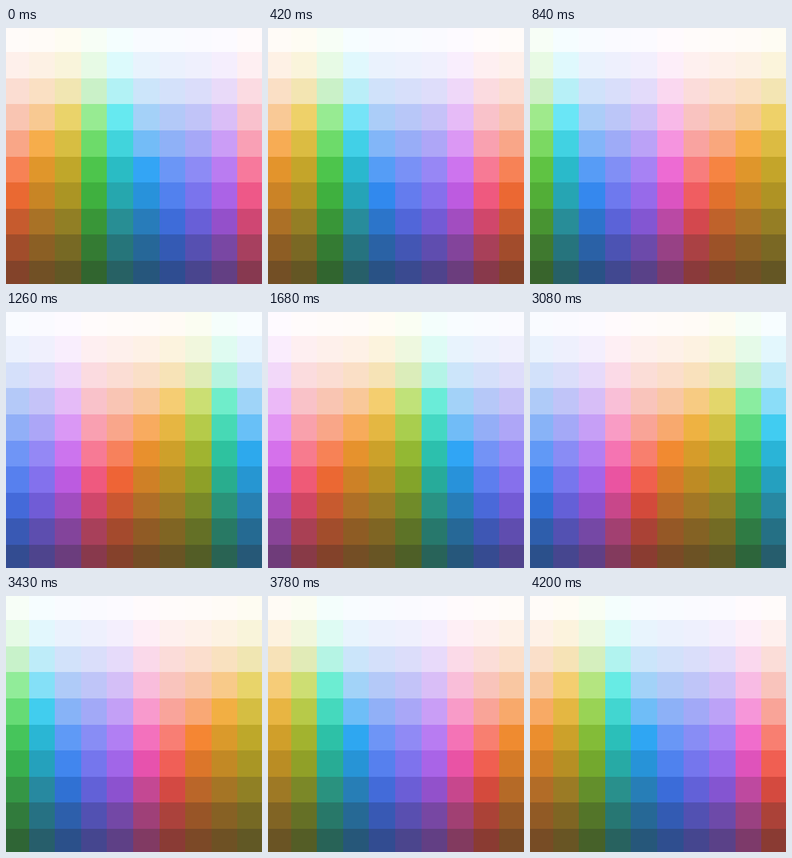
Recreate the animation shown at these times as an HTML page with a canvas. Size 320 by 320 pixels, loop 4270 ms.

```html
<!DOCTYPE html>
<html>
<head>
<meta charset="utf-8">
<style>
html, body { margin: 0; width: 320px; height: 320px; overflow: hidden; background: #fff; }
canvas { display: block; }
</style>
</head>
<body>
<canvas id="stage" width="320" height="320"></canvas>
<script>
const ctx = document.getElementById('stage').getContext('2d');
const STEP = 70, STEPS = 61, TAU = 2 * Math.PI;

// Rows from top to bottom: lightness, chroma ceiling, share of the sRGB gamut
const rows = [
  [.99, .015, .9], [.965, .035, .9], [.92, .07, .85], [.865, .15, .87], [.8, .2, .92],
  [.73, .23, .95], [.67, .23, .94], [.597, .2, .9], [.52, .155, .86], [.457, .12, .78]
];

// Hue in degrees at every half column around the wheel
const wheel = [0, 18, 33, 45, 60, 68, 83, 90, 106, 133, 155, 195, 228, 252, 262, 272, 283, 291, 308, 326];

function hueAt(u) {
  const p = ((u * 2) % 20 + 20) % 20, i = Math.floor(p);
  const next = i < 19 ? wheel[i + 1] : 360;
  return wheel[i] + (next - wheel[i]) * (p - i);
}

function linearRgb(L, C, h) {
  const a = C * Math.cos(h), b = C * Math.sin(h);
  const l = (L + .3963377774 * a + .2158037573 * b) ** 3;
  const m = (L - .1055613458 * a - .0638541728 * b) ** 3;
  const s = (L - .0894841775 * a - 1.291485548 * b) ** 3;
  return [
    4.0767416621 * l - 3.3077115913 * m + .2309699292 * s,
    -1.2684380046 * l + 2.6097574011 * m - .3413193965 * s,
    -.0041960863 * l - .7034186147 * m + 1.707614701 * s
  ];
}

function maxChroma(L, h) {
  let lo = 0, hi = .4;
  for (let i = 0; i < 14; i++) {
    const mid = (lo + hi) / 2;
    if (linearRgb(L, mid, h).every(v => v >= 0 && v <= 1)) lo = mid;
    else hi = mid;
  }
  return lo;
}

function encode(v) {
  v = Math.min(1, Math.max(0, v));
  return Math.round(255 * (v > .0031308 ? 1.055 * v ** (1 / 2.4) - .055 : 12.92 * v));
}

function color([light, ceiling, share], degrees) {
  const h = degrees * TAU / 360;
  // Blues sit slightly darker than the rest of their row
  const L = light - .2 * ceiling * Math.max(0, Math.cos(h - 4.8)) ** 2;
  const C = (ceiling ** -4 + (share * maxChroma(L, h) + 1e-4) ** -4) ** -.25;
  return `rgb(${linearRgb(L, C, h).map(encode)})`;
}

const edgeX = c => c ? Math.round(32.55 * c - 3.7) : 0;
const edgeY = r => r ? Math.round(32.6 * r - 2.4) : 0;

function draw(step) {
  const swing = Math.cos(TAU * step / STEPS);
  const shift = 3.85 + 4.1 * swing + .7 * Math.exp(-step / 8);
  const bend = .4 * Math.max(0, swing) ** 2;
  for (let c = 0; c < 10; c++) {
    const hue = hueAt(c - shift + bend * Math.sin(TAU * c / 10));
    rows.forEach((row, r) => {
      ctx.fillStyle = color(row, hue);
      ctx.fillRect(edgeX(c), edgeY(r), 40, 40);
    });
  }
}

const start = performance.now();
function tick() {
  draw(Math.floor((performance.now() - start) / STEP) % STEPS);
  requestAnimationFrame(tick);
}
tick();
</script>
</body>
</html>
```
